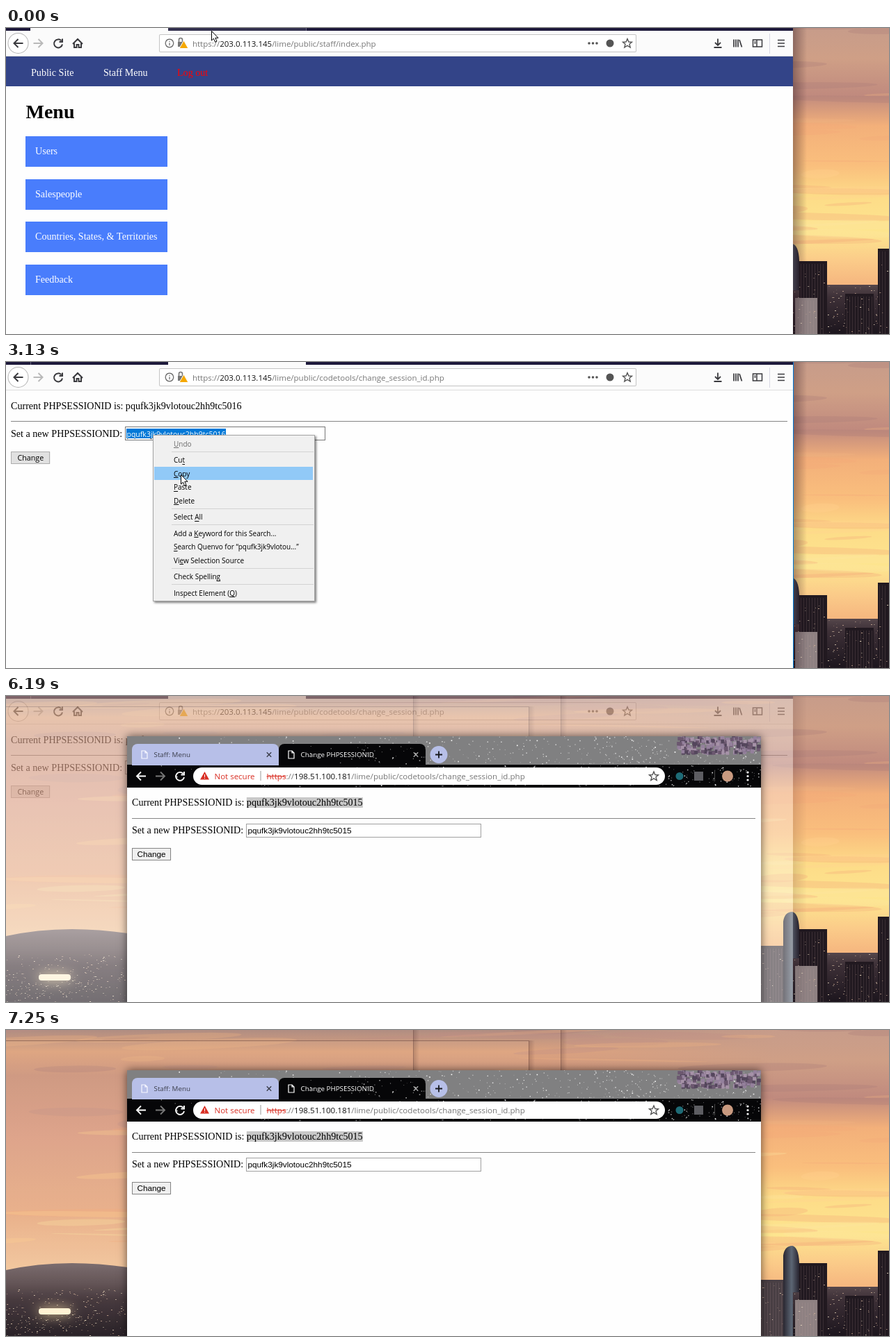
Write an HTML page with a canvas that moves like this. It is 1269 by 441 pixels and loops after 8000 ms.

```html
<!DOCTYPE html>
<html lang="en">
<head>
<meta charset="utf-8">
<title>Session ID</title>
<style>
html, body { margin: 0; width: 100%; height: 100%; overflow: hidden; }
canvas { display: block; }
</style>
</head>
<body>
<canvas id="stage" width="1269" height="441"></canvas>
<script>
const W = 1269, H = 441, LOOP = 8000;
const SANS = '"Open Sans", "Noto Sans", sans-serif';
const SERIF = '14.1px "Liberation Serif", serif';
const ARIAL = '11.75px "Liberation Sans", sans-serif';
const SESSION = 'pqufk3jk9vlotouc2hh9tc50';
const HOST_1 = '203.0.113.145', HOST_2 = '198.51.100.181';
const TOOL_PATH = '/lime/public/codetools/change_session_id.php';
const BLUE = '#0078d7';
const stage = document.getElementById('stage').getContext('2d');
let g = stage, seed = 7;

// ---- helpers ----
const random = () => (seed = seed * 16807 % 2147483647) / 2147483647;
const between = (a, b) => a + random() * (b - a);

function layer(draw) {
  const canvas = document.createElement('canvas'), outer = g;
  canvas.width = W; canvas.height = H;
  g = canvas.getContext('2d');
  draw();
  g = outer;
  return canvas;
}
function rect(color, x, y, w, h) {
  g.fillStyle = color;
  g.fillRect(x, y, w, h);
}
function frame(color, x, y, w, h) {
  g.strokeStyle = color;
  g.lineWidth = 1;
  g.strokeRect(x + .5, y + .5, w - 1, h - 1);
}
function round(color, x, y, w, h, r) {
  g.fillStyle = color;
  g.beginPath();
  g.roundRect(x, y, w, h, r);
  g.fill();
}
const disc = (color, x, y, r) => round(color, x - r, y - r, 2 * r, 2 * r, r);
function path(d, x, y, stroke, width = 1.6, fill) {
  const p = new Path2D(d);
  g.save();
  g.translate(x, y);
  if (fill) { g.fillStyle = fill; g.fill(p); }
  if (stroke) { g.strokeStyle = stroke; g.lineWidth = width; g.stroke(p); }
  g.restore();
}
function text(str, x, y, font, color = '#000') {
  g.font = font;
  g.fillStyle = color;
  g.fillText(str, x, y);
  return x + g.measureText(str).width;
}
function ramp(x0, y0, x1, y1, colors) {
  const r = g.createLinearGradient(x0, y0, x1, y1);
  colors.forEach(([at, color]) => r.addColorStop(at, color));
  return r;
}
const current = (steps, t) => steps.filter(s => s[0] <= t).pop();

const ICON = {
  back: 'M7 0H-6M0-6L-6 0L0 6',
  forward: 'M-7 0H6M0-6L6 0L0 6',
  reload: 'M4.6-3.6A6 6 0 1 0 6 1.5M6-6.5V-2H1.5',
  home: 'M-7 1L0-6L7 1M-5 0V6H-1.5V2H1.5V6H5V0',
  star: 'M0-6.5L1.9-2L6.5-1.7L3 1.3L4.2 6L0 3.4L-4.2 6L-3 1.3L-6.5-1.7L-1.9-2Z',
  warning: 'M0-6L6.5 5.5H-6.5Z',
  cross: 'M-3.2-3.2L3.2 3.2M3.2-3.2L-3.2 3.2',
  sheet: 'M-4-5.5H1L4-2.5V5.5H-4ZM1-5.5V-2.5H4',
  arrow: 'M.5.5V14L3.4 11.2L5.6 16.3L8 15.2L5.8 10.3H10Z',
  beam: 'M-3-7H-1L0-6L1-7H3M0-6V6M-3 7H-1L0 6L1 7H3'
};

// ---- desktop ----
function drawDesktop() {
  rect(ramp(0, 0, 0, H, [[0, '#b08d82'], [.07, '#dca27e'], [.15, '#cd957f'], [.35, '#dca087'],
    [.6, '#e8ae88'], [.78, '#f2c59c'], [.9, '#efbc93']]), 0, 0, W, H);
  const glow = ramp(0, 0, 0, H, [[0, '#c79c8a'], [.1, '#cf9f86'], [.22, '#c08a7e'], [.32, '#f3b07a'],
    [.45, '#fabf7d'], [.55, '#fddc88'], [.67, '#fde58f'], [.76, '#fbcb89'], [.87, '#f3ae7b']]);
  for (let x = 750; x < W; x += 3) {
    g.globalAlpha = Math.min(1, (x - 750) / 350);
    rect(glow, x, 0, 3, H);
  }
  g.globalAlpha = .3;
  for (let i = 0; i < 130; i++) {
    const y = between(0, 330), warm = y > 140;
    const color = warm ? ['#ffd08e', '#f0a678', '#fbe3a0'] : ['#a87a78', '#efb383', '#bd8d84'];
    g.fillStyle = color[i % 3];
    g.beginPath();
    g.ellipse(between(0, W), y, between(25, 150), between(1, 7), between(-.06, .03), 0, 7);
    g.fill();
  }
  g.globalAlpha = 1;

  path('M0 346Q80 328 175 342L430 356L700 370H1269V441H0Z', 0, 0, null, 0,
    ramp(0, 335, 0, H, [[0, '#75666a'], [.3, '#594a4e'], [.5, '#3d3037'], [1, '#1c151d']]));
  lights(1500, 0, 372, W, 69);
  tower(1048, 70, 360, '#493f44');
  [[430, 58, 255], [497, 48, 252], [540, 65, 283], [612, 35, 207], [650, 33, 264], [600, 80, 315],
    [713, 33, 257], [680, 70, 305], [788, 71, 288], [897, 25, 322], [920, 28, 282], [949, 29, 293],
    [983, 17, 338], [945, 64, 375], [525, 56, 374], [745, 100, 372], [1140, 40, 336],
    [1253, 16, 318], [1206, 41, 383]].forEach(([x, w, top]) => tower(x, w, top, '#211920'));
  path('M1117 441V325Q1119 311 1130 311Q1139 313 1140 335V378H1131V441Z', 0, 0, null, 0,
    ramp(1117, 0, 1141, 0, [[0, '#292630'], [.5, '#5c6674'], [1, '#211c27']]));
  tower(1134, 32, 389, '#8e8182');
  g.shadowColor = '#ffe3a8';
  g.shadowBlur = 18;
  round('#fff3d4', 47, 401, 46, 9, 4);
  g.shadowBlur = 0;
  lights(60, 10, 410, 120, 20);
}
function lights(count, x, y, w, h) {
  for (let i = 0; i < count; i++) {
    g.globalAlpha = between(.15, .85);
    rect(i % 3 ? '#d9b69c' : '#fff0d0', Math.floor(between(x, x + w)),
      Math.floor(between(y, y + h)), between(1, 2.4), 1);
  }
  g.globalAlpha = 1;
}
function tower(x, w, top, color) {
  rect(color, x, top, w, H - top);
  g.globalAlpha = .16;
  for (let i = x + 2; i < x + w - 2; i += 4) rect('#c0a3a0', i, top + 4, 1, H - top);
  g.globalAlpha = 1;
  lights(w / 2, x, top + 6, w - 2, H - top);
}
function drawPeekEdges() {
  const line = 'rgba(95,60,55,.5)';
  rect('rgba(255,225,200,.06)', 0, 16, 751, H);
  rect(line, 0, 15, 751, 1);
  [[585, 0], [751, 15], [797, 0]].forEach(([x, y]) => {
    rect(line, x, y, 1, H);
    rect(ramp(x, 0, x + 9, 0, [[0, 'rgba(70,40,40,.25)'], [1, 'rgba(70,40,40,0)']]), x + 1, y, 8, H);
  });
}

// ---- shared page ----
function sessionPage(x, y, digits, wide) {
  const field = wide ? 338 : 288, top = y + (wide ? 26 : 25), font = wide ? ARIAL : '10.5px ' + SANS;
  const start = text('Current PHPSESSIONID is: ', x, y, SERIF);
  if (digits === '15') rect('#c8c8c8', start, y - 12, 167, 15);
  text(SESSION + digits, start, y, SERIF);
  rect('#858585', x, y + (wide ? 18 : 17), wide ? 896 : 1116, 1);
  text('Set a new PHPSESSIONID:', x, y + 40, SERIF);
  rect('#fff', x + 164, top, field, 20);
  frame(wide ? '#a0a0a0' : '#777', x + 164, top, field, 20);
  text(SESSION + digits, x + 166.5, y + 39.5, font);
  rect(wide ? '#f0f0f0' : '#e1e1e1', x + .5, y + 61, 56, 18);
  frame(wide ? '#858585' : '#adadad', x, y + 61, 56, 18);
  text('Change', x + (wide ? 7.5 : 9.5), y + 74, wide ? ARIAL : '10.7px ' + SANS);
}
function address(x, y, size, host, rest, secureColor) {
  const font = size + 'px ' + SANS;
  let end = text('https', x, y, font, secureColor);
  if (secureColor !== '#777') rect(secureColor, x, y - 4, end - x, 1);
  end = text('://', end, y, font, '#777');
  end = text(host, end, y, font, '#111');
  text(rest, end, y, font, '#777');
}

// ---- first browser ----
function drawFirst(menuOpen) {
  const ink = '#3a3a3e', tabX = menuOpen ? 35 : 233;
  rect(ramp(1131, 0, 1151, 0, [[0, 'rgba(40,20,30,.38)'], [1, 'rgba(40,20,30,0)']]), 1131, 0, 20, H);
  rect('#fefefe', 0, 0, 1131, H);
  rect('#1d193b', 0, 0, 1131, 4);
  if (menuOpen) rect('#34314f', 233, 0, 198, 4);
  rect('#65627a', menuOpen ? 431 : 35, 0, 1, 4);
  rect('#fbfbfb', tabX, 0, 198, 4);
  rect('#fbfbfb', 0, 4, 1131, 36);
  rect('#dedede', 0, 40, 1131, 1);

  disc('#b5b5b5', 17.5, 22, 15);
  disc('#fff', 17.5, 22, 14);
  path(ICON.back, 17.5, 22, ink, 2);
  path(ICON.forward, 46.5, 22, '#b9b9b9', 2);
  path(ICON.reload, 75, 22, ink, 2);
  path(ICON.home, 103, 22, ink, 2);
  round('#c4c4c4', 220, 9, 686, 26, 2);
  round('#fff', 221, 10, 684, 24, 1);
  path('M0-5.8A5.8 5.8 0 1 1-.1-5.8ZM0-.8V3.3M0-3.2V-2', 235, 22, '#666', 1.2);
  path('M-2.5 0V-3A2.5 2.5 0 0 1 2.5-3V0', 251, 20, '#777', 1.6);
  rect('#777', 247, 20, 8, 7);
  path(ICON.warning, 255.5, 24, '#fff', 1, '#f5a800');
  address(268, 27, 11.5, HOST_1, menuOpen ? '/lime/public/staff/index.php' : TOOL_PATH, '#777');
  [838, 843.5, 849].forEach(x => disc('#555', x, 22, 1.8));
  disc('#555', 868, 22, 5.5);
  path(ICON.star, 893, 22, '#555', 1.4);
  path('M0-6.5V3M-4-1L0 3L4-1M-5.5 6H5.5', 1023, 22, ink, 1.8);
  path('M-5-5.5V5.5M-2-5.5V5.5M1-5.5V5.5M3-5L6.5 5.5', 1051, 22, ink, 1.7);
  path('M-6.5-5H6.5V5H-6.5ZM-1-5V5M-4.5-2H-2.5M-4.5 0H-2.5', 1080, 22, ink, 1.5);
  rect('#d9d9e4', 1097, 8, 1, 29);
  path('M-5-4.5H5M-5 0H5M-5 4.5H5', 1114, 22, ink, 1.7);

  if (!menuOpen) return sessionPage(7, 68, '16', false);
  rect('#334488', 0, 41, 1131, 43);
  text('Public Site', 36, 69, SERIF, '#fff');
  text('Staff Menu', 140, 69, SERIF, '#fff');
  text('Log out', 246, 69, SERIF, '#f00');
  text('Menu', 28.5, 130, 'bold 28px "Liberation Serif", serif');
  ['Users', 'Salespeople', 'Countries, States, & Territories', 'Feedback'].forEach((label, i) => {
    const y = Math.round(156 + i * 61.6);
    rect('#497dfc', 28, y, 204, 44);
    text(label, 42, y + 26, SERIF, '#fff');
  });
}

// ---- second browser ----
function stars(count, x, y, w, h) {
  for (let i = 0; i < count; i++) {
    const size = between(.5, 1.7);
    g.globalAlpha = between(.3, 1);
    rect('#fff', x + w * Math.sqrt(random()), between(y, y + h - 1), size, size);
  }
  g.globalAlpha = 1;
}
function tab(x, label, active) {
  const color = active ? '#fff' : '#3b3e4b';
  round(active ? '#060608' : '#b7bfe8', x, 69, 211, 31, [8, 8, 0, 0]);
  if (active) stars(40, x, 71, 211, 28);
  path(ICON.sheet, x + 18, 84.5, active ? '#fff' : '#f7f7ff', 1.2);
  text(label, x + 31.5, 88, '9.8px ' + SANS, color);
  path(ICON.cross, x + 197, 84.5, active ? '#aaa' : color, 1.4);
}
function drawSecond(host, digits, tabCount) {
  g.shadowColor = 'rgba(0,0,0,.6)';
  g.shadowBlur = 12;
  rect('#fefefe', 174, 58, 911, 500);
  g.shadowColor = 'transparent';
  g.shadowBlur = 0;
  rect('#808081', 174, 58, 911, 41);
  stars(420, 174, 58, 911, 41);
  for (let i = 0; i < 260; i++) {
    rect(['#6c5870', '#94809c', '#54465c', '#a692a8'][i % 4], between(964, 1080), between(58, 80), 5, 5);
  }
  rect('#060608', 174, 99, 911, 33);
  stars(330, 174, 100, 911, 31);
  for (let i = 0; i < tabCount; i++) tab(181 + i * 211, i % 2 ? 'Change PHPSESSIONID' : 'Staff: Menu', i === 1);
  const plusX = 200 + tabCount * 211;
  disc('#b7bfe8', plusX, 84.5, 12.5);
  path('M-5 0H5M0-5V5', plusX, 84.5, '#17181d', 1.8);

  path(ICON.back, 194, 115.5, '#fff', 1.9);
  path(ICON.forward, 222, 115.5, '#777', 1.9);
  path(ICON.reload, 250, 115.5, '#fff', 1.9);
  round('#fff', 269, 103, 678, 25, 12.5);
  path(ICON.warning, 285.5, 115, null, 0, '#d93025');
  rect('#fff', 285, 113, 1, 4);
  rect('#fff', 285, 118, 1, 1);
  text('Not secure', 299.5, 119.5, '11.5px ' + SANS, '#d93025');
  rect('#999', 365.5, 108, 1, 14);
  address(374.5, 119.5, 11.6, host, TOOL_PATH, '#d93025');
  path(ICON.star, 931, 115.5, '#555', 1.4);
  disc('#1e6b76', 968, 115.5, 5.5);
  rect('#5d5d62', 989, 109, 13, 13);
  rect('#444', 1018, 107, 1, 16);
  disc('#c99a80', 1037, 115.5, 8);
  [110, 115.5, 121].forEach(y => disc('#fff', 1066, y, 1.6));
  sessionPage(181, 158, digits, true);
}

// ---- live parts ----
const MENU = ['&Undo', '-', 'Cu&t', '&Copy', '&Paste', '&Delete', '-', 'Select &All', '-',
  'Add a &Keyword for this Search...', '&Search Quenvo for “pqufk3jk9vlotou...”', 'Vi&ew Selection Source',
  '-', 'Check Spellin&g', '-', 'Inspect Element (&Q)'];

function contextMenu(hover) {
  const font = '10px ' + SANS;
  g.shadowColor = 'rgba(0,0,0,.5)';
  g.shadowBlur = 3;
  g.shadowOffsetX = g.shadowOffsetY = 2;
  rect('#f0f0f0', 211, 105, 233, 240);
  g.shadowColor = 'transparent';
  g.shadowBlur = g.shadowOffsetX = g.shadowOffsetY = 0;
  frame('#a5a5a5', 211, 105, 233, 240);
  let y = 118;
  MENU.forEach((item, i) => {
    if (item === '-') {
      rect('#d3d3d3', 238, Math.floor(y - 8.5), 204, 1);
      y += 4;
      return;
    }
    if (i === hover) rect('#91c9f7', 213, Math.round(y - 10), 228, 19);
    const [before, after] = item.split('&'), color = i ? '#000' : '#6d6d6d';
    const x = text(before, 241, y + 3.5, font, color);
    text(after, x, y + 3.5, font, color);
    rect(color, x, Math.round(y + 5), g.measureText(after[0]).width, 1);
    y += 19.5;
  });
}
function selection(from) {
  g.save();
  g.beginPath();
  g.rect(from, 96, 316 - from, 14);
  g.clip();
  rect(BLUE, 173, 96, 143, 14);
  text(SESSION + '16', 173.5, 107.5, '10.5px ' + SANS, '#fff');
  g.restore();
}

// time, x, y, shape
const POINTER = [
  [0, 295, 4, 'arrow'], [150, 295, 3, 'arrow'], [430, 295, 2, 'arrow'],
  [1000, 299, 14, 'arrow'], [1120, 312, 42, 'arrow'], [1240, 328, 72, 'arrow'], [1360, 341, 96, 'beam'],
  [1480, 347, 105, 'beam'], [1790, 287, 105, 'beam'], [1940, 172, 95, 'beam'], [2090, 130, 91, 'beam'],
  [2370, 174, 100, 'beam'], [2490, 211, 105, 'beam'], [2740, 211, 105, 'arrow'], [2890, 222, 121, 'arrow'],
  [3010, 240, 143, 'arrow'], [3130, 251, 162, 'arrow'], [3600, 338, 186, 'arrow'], [3740, 438, 222, 'arrow'],
  [3860, 548, 267, 'arrow'], [3980, 619, 302, 'arrow'], [4100, 597, 309, 'arrow'], [4260]
];
// time, opacity of the three windows
const WINDOWS = [
  [0, 1, 0, 0], [6190, .35, 1, 0], [6310, 0, 1, 0], [6860, 0, .2, .87],
  [6980, 0, 0, 1], [7110, 0, 1, .35], [7250, 0, 1, 0]
];

const desktop = layer(drawDesktop);
const peekEdges = layer(drawPeekEdges);
const menuWindow = layer(() => drawFirst(true));
const toolWindow = layer(() => drawFirst(false));
const secondWindow = layer(() => drawSecond(HOST_2, '15', 2));
const thirdWindow = layer(() => {
  g.translate(-165, -91);
  drawSecond(HOST_1, '14', 3);
});

function render() {
  const t = performance.now() % LOOP;
  const [, first, second, third] = current(WINDOWS, t);
  g.drawImage(desktop, 0, 0);
  if (t >= 6190) g.drawImage(peekEdges, 0, 0);
  [[first, t < 570 ? menuWindow : toolWindow], [second, secondWindow], [third, thirdWindow]]
    .sort((a, b) => a[0] - b[0])
    .forEach(([alpha, image]) => {
      if (!alpha) return;
      g.globalAlpha = alpha;
      g.drawImage(image, 0, 0);
    });
  g.globalAlpha = 1;

  if (t >= 570 && t < 5220) rect(BLUE, 1131, 0, 1, H);
  if (t >= 1640 && t < 2890) frame(BLUE, 171, 93, 288, 20);
  if (t >= 1790 && t < 5220) selection(t < 1940 ? 287 : 173);
  if (t >= 2740 && t < 3440) contextMenu(t < 3010 ? -1 : t < 3130 ? 2 : 3);
  const [, x, y, shape] = current(POINTER, t);
  if (shape === 'arrow') path(ICON.arrow, x, y, '#000', 1, '#fff');
  if (shape === 'beam') path(ICON.beam, x + .5, y + .5, '#000', 1);
  requestAnimationFrame(render);
}
render();
</script>
</body>
</html>
```
